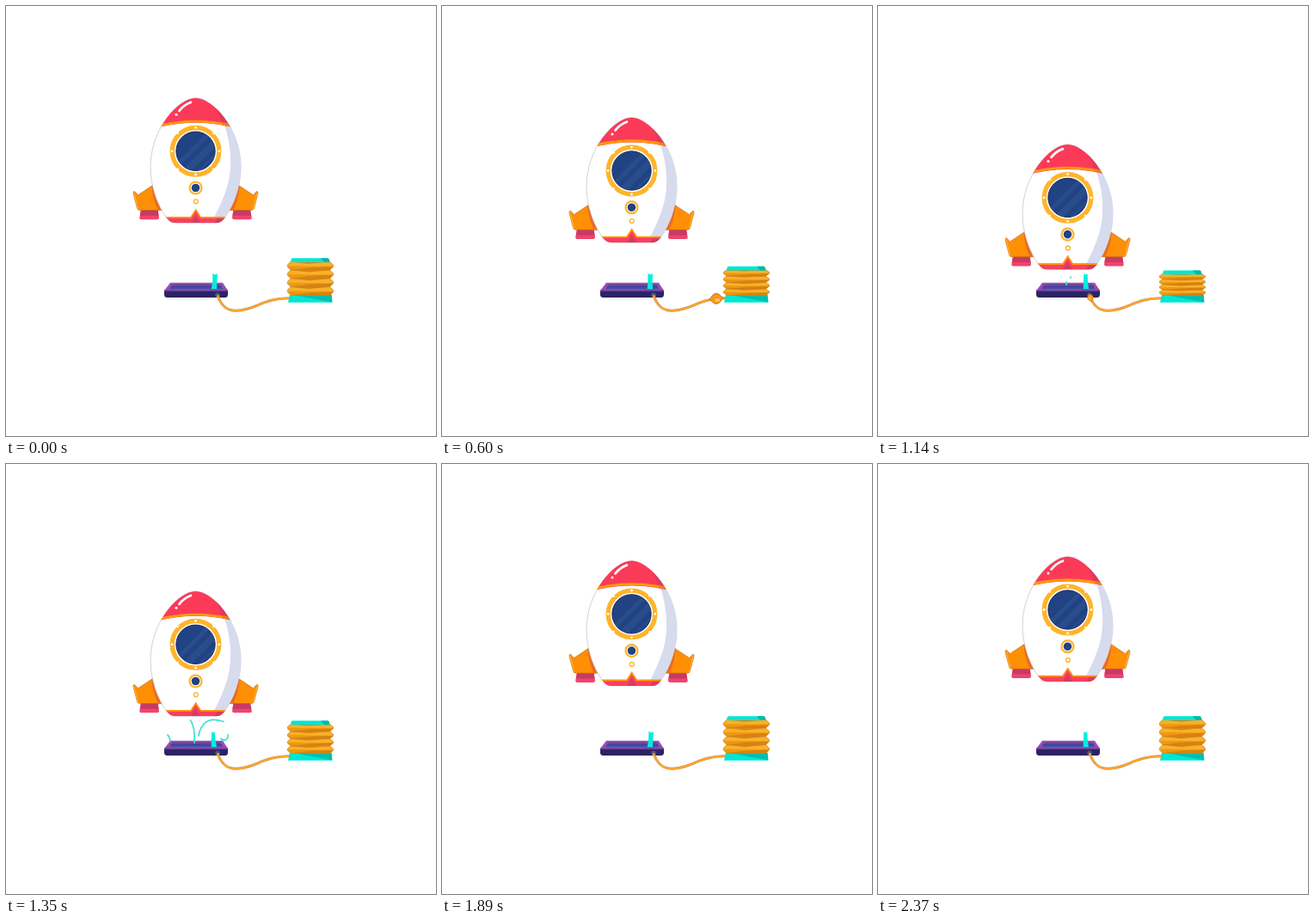
An HTML page that plays this animation: 500x500 px, repeating every 2400 ms.

```html
<!DOCTYPE html>
<html lang="en">
<head>
<meta charset="utf-8">
<title>Rocket and pump</title>
<style>
html, body { margin: 0; width: 100%; height: 100%; overflow: hidden; background: #fff; }
svg { display: block; width: 100%; height: 100%; }
</style>
</head>
<body>
<svg viewBox="0 0 500 500">
  <defs>
    <clipPath id="hull"><path id="egg" d="M220.500 106.700C201 106.700 168 142 168 187C168 211 177 233 187 246.500Q191 252 197 252H244Q250 252 254 246.500C264 233 273 211 273 187C273 142 240 106.700 220.500 106.700Z"/></clipPath>
    <clipPath id="pane"><circle cx="220.500" cy="168.500" r="22.500"/></clipPath>
    <g id="fin">
      <path d="M157 236.500H176.500L178 245.500Q178 248 175.500 248H157.500Q155 248 155.300 245.500Z" fill="#f0436c"/>
      <path d="M157 236.500H176.500L177.500 243.500H155.800Z" fill="#c83a66"/>
      <path d="M171.500 207.500L153.500 219.500L149.500 215.300Q147.500 215 148 218L152.500 235Q153.200 237.300 155.500 237.300H183Z" fill="#ff8f05" stroke="#a8611c" stroke-width=".5"/>
      <path d="M148.700 216.500L153.700 236" stroke="#ffb02e" stroke-width="1.300"/>
      <path d="M171.500 207.500L169.500 209C170 220 173 230 177 237.300H184Z" fill="#ec6a20"/>
    </g>
  </defs>

  <path d="M191 321.800H252L258 331H184Z" fill="#9a4bb4"/>
  <path d="M193.500 324H249.500L252.500 329H190.500Z" fill="#3a2f80"/>
  <path d="M193 325.300H250.500M191.500 327.900H252" stroke="#4868c0" stroke-width="1.300"/>
  <path d="M184 330.500H258V335.500Q258 339 254.500 339H187.500Q184 339 184 335.500Z" fill="#2b2362"/>
  <path d="M184 330.800H258" stroke="#7d40a6" stroke-width="1.800"/>
  <path id="post" fill="#00eede"/>
  <circle cx="246" cy="336" r="2.800" fill="#4b557e"/>

  <path id="hose" d="M330 339.800C298 339.500 291 353.500 268 354.200C256 354.500 250 348 246 336.500" fill="none" stroke="#c98430" stroke-width="3"/>
  <path d="M330 339.800C298 339.500 291 353.500 268 354.200C256 354.500 250 348 246 336.500" fill="none" stroke="#ffa834" stroke-width="1.900"/>
  <g id="bulge">
    <path d="M-9.500 0C-6 -2 -5 -6.800 0 -6.800C5 -6.800 6 -2 9.500 0C6 2 5 6.800 0 6.800C-5 6.800 -6 2 -9.500 0Z" fill="#f7991c" stroke="#b9681d" stroke-width=".9"/>
    <ellipse cx="1" cy="2" rx="3.500" ry="2.300" fill="#ffc05a"/>
  </g>

  <path d="M330 335.500H378.500L379.500 344.800H328Z" fill="#00e6d2"/>
  <path d="M335 336H378.500L379.200 344.500Z" fill="#00bfae"/>
  <g id="bellows"></g>
  <g id="plate">
    <path d="M333 293.300H374Q375.500 293.300 375.800 295L376.500 298H331L331.500 295Q331.700 293.300 333 293.300Z" fill="#00e6d2"/>
    <path d="M366 293.300H374Q375.500 293.300 375.800 295L376.500 298H370Z" fill="#00b8a9"/>
  </g>

  <g id="air" fill="none" stroke="#42e3d5" stroke-width="1.800" stroke-linecap="round">
    <path pathLength="100" d="M219 324C219.700 314 218.500 304 214.500 298"/>
    <path pathLength="100" d="M224 316C226 304 233 297 242 297.300Q248 297.600 253 299.500"/>
    <path pathLength="100" d="M191 321.500Q190.500 317.500 188 315"/>
    <path pathLength="100" d="M250 319.500C254 323 258.500 321 258.300 314"/>
  </g>

  <g id="rocket">
    <use href="#fin"/>
    <use href="#fin" transform="translate(441 0) scale(-1 1)"/>
    <use href="#egg" fill="#fff" stroke="#b0b1c2" stroke-width=".6"/>
    <g clip-path="url(#hull)">
      <path d="M251 130C260 153 263 174 260 197C257 215 249 233 240 249V252H280V130Z" fill="#d6dbed"/>
      <path d="M160 146Q220.500 125 281 146V100H160Z" fill="#fb3a58"/>
      <path d="M233 104Q247 118 252 138L270 142V104Z" fill="#dc3a5d"/>
      <path d="M165 142.500Q220.500 125 276 142.500" fill="none" stroke="#ff9a0c" stroke-width="2.800"/>
      <path d="M252 136L276 142.500" stroke="#ec7d16" stroke-width="2.800"/>
      <path d="M180 245.800H214.500L220.500 237.300L226.500 245.800H262V254H180Z" fill="#f93f5f"/>
      <path d="M246 245.800H262V254H241ZM220.500 243L226 252H215Z" fill="#d63c5f"/>
      <path d="M180 245.600H215L220.700 236.800L226.400 245.600H262" fill="none" stroke="#ff960c" stroke-width="1.800"/>
    </g>
    <path d="M201.500 121.500Q207 114.500 215 111.700" fill="none" stroke="#fff" stroke-width="2.800" stroke-linecap="round"/>
    <circle cx="198" cy="126" r="1.500" fill="#fff"/>

    <circle cx="220.500" cy="168.500" r="27.300" fill="#fff" stroke="#ffb42a" stroke-width="5.300"/>
    <g id="rivets" fill="#fff"></g>
    <circle cx="220.500" cy="168.500" r="22.700" fill="#214283" stroke="#1b2d61" stroke-width="1"/>
    <g clip-path="url(#pane)" stroke="#294d8b">
      <path d="M200 184L235 149" stroke-width="5"/>
      <path d="M211 190L246 155" stroke-width="8"/>
      <path d="M222 194L250 166" stroke-width="2"/>
    </g>
    <circle cx="220.500" cy="211.200" r="7" fill="#fff" stroke="#ffb42a" stroke-width="2.200"/>
    <circle cx="220.500" cy="211.200" r="4.800" fill="#214283"/>
    <circle cx="220.800" cy="227" r="2.400" fill="#fff" stroke="#ffb42a" stroke-width="1.400"/>
  </g>
</svg>
<script>
const LOOP = 2400, STEP = 30;
const $ = id => document.getElementById(id);
const hose = $('hose'), hoseLen = hose.getTotalLength();
const airLines = [...$('air').children];
const clamp = x => Math.max(0, Math.min(1, x));
const ease = (t, a, b) => (1 - Math.cos(Math.PI * clamp((t - a) / (b - a)))) / 2;

// Time/value keys
const DROP = [[0, .3], [240, 2.9], [540, 18], [600, 23], [870, 46], [1080, 55.5], [1350, 41.3],
  [1620, 17.4], [1890, 5.9], [2160, 1.4], [2370, 1], [2400, .3]];
const TRAVEL = [[420, 2], [600, 11], [870, 21], [1080, 78], [1170, hoseLen]];
const LEAN = [[0, 1], [240, -.8], [600, 0], [870, 0], [1350, -1.3], [1890, 1], [2370, -1], [2400, 1]];

// Smooth monotone curve through the keys
function curve(keys, t) {
  const n = keys.length;
  if (t <= keys[0][0]) return keys[0][1];
  if (t >= keys[n - 1][0]) return keys[n - 1][1];
  const i = keys.findIndex(k => k[0] > t) - 1;
  const slope = j => (keys[j + 1][1] - keys[j][1]) / (keys[j + 1][0] - keys[j][0]);
  const tangent = j => {
    if (j === 0 || j === n - 1) return 0;
    const a = slope(j - 1), b = slope(j);
    return a * b <= 0 ? 0 : 2 * a * b / (a + b);
  };
  const [t0, v0] = keys[i], [t1, v1] = keys[i + 1], h = t1 - t0, u = (t - t0) / h;
  return v0 + (v1 - v0) * u * u * (3 - 2 * u)
    + h * u * (1 - u) * (tangent(i) * (1 - u) - tangent(i + 1) * u);
}

$('rivets').innerHTML = Array.from({ length: 8 }, (_, i) => {
  const a = i * Math.PI / 4, r = i % 2 ? 29.7 : 27.4;
  return `<circle cx="${220.5 + r * Math.cos(a)}" cy="${168.5 + r * Math.sin(a)}" r="1.4"/>`;
}).join('');

function drawBellows(squash) {
  const top = 297.3 + squash, h = (336.3 - top) / 4;
  let out = '';
  for (let i = 0; i < 4; i++) {
    const y = top + i * h, at = k => (y + h * k).toFixed(2);
    out += `<path d="M331 ${at(0)}H376.500L380.500 ${at(.38)}V${at(.62)}L376.500 ${at(1)}H331L327.300 ${at(.62)}V${at(.38)}Z" fill="#fbb02a" stroke="#b8701a" stroke-width=".6"/>`
      + `<path d="M327.500 ${at(.5)}L380.500 ${at(.55)}L376.500 ${at(1)}H331Z" fill="#ec9912"/>`
      + `<path d="M331 ${at(.98)}L356 ${at(.68)}L380 ${at(.58)}L376.500 ${at(1)}Z" fill="#d8820f"/>`
      + `<path d="M331 ${at(.03)}H376.500L352 ${at(.24)}Z" fill="#d8840f"/>`;
  }
  $('bellows').innerHTML = out;
  $('plate').setAttribute('transform', `translate(0 ${squash})`);
}

function drawBulge(t) {
  const size = clamp((t - 420) / 150) * (.88 + .12 * clamp((t - 600) / 270)) * clamp((1170 - t) / 60);
  $('bulge').style.display = size > 0 ? '' : 'none';
  if (!size) return;
  const s = curve(TRAVEL, t);
  const p = hose.getPointAtLength(s);
  const a = hose.getPointAtLength(Math.max(0, s - 2)), b = hose.getPointAtLength(Math.min(hoseLen, s + 2));
  const turn = Math.atan2(a.y - b.y, a.x - b.x) * 180 / Math.PI;
  $('bulge').setAttribute('transform', `translate(${p.x} ${p.y}) rotate(${turn}) scale(${size})`);
}

function drawAir(t) {
  airLines.forEach((line, i) => {
    const start = 1095 + i * 25;
    const head = 100 * ease(t, start, start + 210);
    const tail = 100 * ease(t, start + 230, start + 460);
    const shown = head - tail;
    line.style.display = shown > .5 ? '' : 'none';
    line.setAttribute('stroke-dasharray', `0 ${tail} ${Math.max(0, shown)} 300`);
  });
}

function draw(t) {
  $('rocket').setAttribute('transform', `translate(0 ${curve(DROP, t)})`);
  drawBellows(18 * (ease(t, 230, 950) - ease(t, 950, 1580)));
  drawBulge(t);
  drawAir(t);
  const x = curve(LEAN, t), w = Math.min(0, x);
  $('post').setAttribute('d', `M${239.4 + x - w} 310.700L${242 + x} 312.500L${245 + x + w * .8} 311.200Q${244.3 + x} 319 245 329H238.700Q${239.8 + x} 320 ${239.4 + x - w} 310.700Z`);
}

function tick(now) {
  draw(Math.floor((now % LOOP) / STEP) * STEP);
  requestAnimationFrame(tick);
}
draw(0);
requestAnimationFrame(tick);
</script>
</body>
</html>
```
